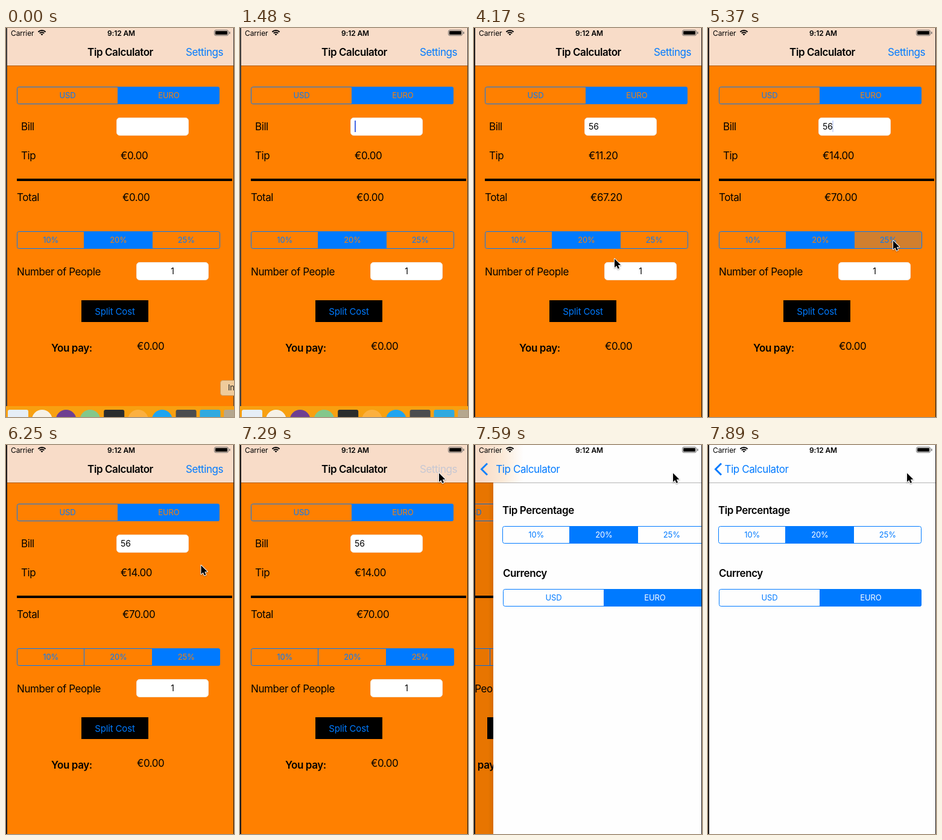
An HTML page with a canvas for the animation above (8000 ms loop, 378 by 643 pixels).

```html
<!DOCTYPE html>
<html lang="en">
<head>
<meta charset="utf-8">
<title>Tip Calculator</title>
<style>
html, body { margin: 0; width: 100%; height: 100%; overflow: hidden; background: #ff8000; }
canvas { display: block; width: 378px; height: 643px; }
</style>
</head>
<body>
<canvas id="stage"></canvas>
<script>
const W = 378, H = 643, LOOP = 8000, STEP = 149;
const BLUE = '#007aff', ORANGE = '#ff8000', PEACH = '#f8dcc8', PAGE = '#fefefe';
const PRESS_RATE = 5300, PICK_RATE = 5450, PRESS_SETTINGS = 7200, PUSH = 7370;

const canvas = document.getElementById('stage');
const dpr = window.devicePixelRatio || 1;
canvas.width = W * dpr;
canvas.height = H * dpr;
const ctx = canvas.getContext('2d');

const clamp = v => Math.min(1, Math.max(0, v));
const smooth = v => v * v * (3 - 2 * v);
const lerp = (a, b, k) => a + (b - a) * k;

const sampled = t => Math.floor((t + 19) / STEP) * STEP;

// Blinks with a short fade; focus and key presses restart the cycle.
function caretAlpha(t) {
  const half = 492, fade = 150;
  const start = [261, 2466, 3100, 3360].filter(s => s <= t).pop();
  if (start === undefined || t > PRESS_SETTINGS) return 0;
  const age = t - start, phase = age % (2 * half);
  if (phase >= half) return clamp(1 - (phase - half) / fade);
  return age < half ? 1 : clamp(phase / fade);
}

function typed(t) {
  return '56'.slice(0, Math.max(0, Math.floor((t - 2970) / STEP)));
}

// Stops of the mouse: time, x, y.
const STOPS = [[1900, 380, 650], [2370, 365, 389.5], [3750, 365, 389.5], [4170, 233, 381.5],
  [4350, 233, 381.5], [5070, 307, 351.5], [5850, 307, 351.5], [6700, 342, 27], [7000, 330, 46.5]];

function pointerAt(t) {
  const i = STOPS.findIndex(stop => stop[0] > t);
  if (i < 1) return STOPS[i === 0 ? 0 : STOPS.length - 1].slice(1);
  const [t0, x0, y0] = STOPS[i - 1], [t1, x1, y1] = STOPS[i];
  const k = smooth((t - t0) / (t1 - t0));
  return [lerp(x0, x1, k), lerp(y0, y1, k)];
}

// Critically damped spring.
function pushAt(t) {
  const w = Math.max(0, t - PUSH) * .0182;
  const p = 1 - (1 + w) * Math.exp(-w);
  return p > .995 ? 1 : p;
}

function text(str, x, y, { size = 17, weight = 400, color = '#000', align = 'left', alpha = 1 } = {}) {
  ctx.save();
  ctx.globalAlpha *= alpha;
  ctx.font = `${weight} ${size}px Inter, Roboto, sans-serif`;
  ctx.letterSpacing = (size > 15 ? -.025 : -.01) * size + 'px';
  ctx.textAlign = align;
  ctx.fillStyle = color;
  ctx.fillText(str, x, y);
  ctx.restore();
}

function rect(x, y, w, h, color) {
  ctx.fillStyle = color;
  ctx.fillRect(x, y, w, h);
}

function roundRect(x, y, w, h, r, fill, stroke) {
  ctx.beginPath();
  ctx.roundRect(x, y, w, h, r);
  if (fill) { ctx.fillStyle = fill; ctx.fill(); }
  if (stroke) { ctx.strokeStyle = stroke; ctx.lineWidth = 1; ctx.stroke(); }
}

function segments(x, y, w, labels, selected, back, pressed = -1) {
  const cell = w / labels.length, h = 29;
  ctx.save();
  ctx.beginPath();
  ctx.roundRect(x, y, w, h, 3.5);
  ctx.clip();
  labels.forEach((label, i) => {
    const left = Math.round(x + i * cell), right = Math.round(x + (i + 1) * cell);
    if (i === selected) rect(left, y, right - left, h, BLUE);
    if (i === pressed) rect(left, y, right - left, h, 'rgba(0,122,255,.18)');
    if (i) rect(left - 1, y, 1, h, BLUE);
    text(label, x + (i + .5) * cell, y + 19,
      { size: 13, align: 'center', color: i === selected ? back : BLUE });
  });
  ctx.restore();
  roundRect(x + .5, y + .5, w - 1, h - 1, 3, null, BLUE);
}

function field(x, y) {
  roundRect(x + .5, y + .5, 119, 29, 5, '#fff', '#f0e6dc');
}

const money = value => '€' + value.toFixed(2);

function calculator(t) {
  const bill = typed(t);
  const tip = bill * (t > PRESS_RATE ? .25 : .2);
  const picked = t > PICK_RATE;
  rect(0, 0, W + 120, H, ORANGE);
  segments(18, 97, 336, ['USD', 'EURO'], 1, ORANGE);

  text('Bill', 25, 169);
  field(183, 148);
  text(bill, 190, 168, { size: 14 });
  ctx.globalAlpha = caretAlpha(t);
  rect(190 + bill.length * 8, 153, 2, 19, '#4468e4');
  ctx.globalAlpha = 1;

  text('Tip', 25, 217);
  text(money(tip), 190, 217);
  rect(18, 249, 357, 4, '#000');
  text('Total', 18, 286);
  text(money(tip + +bill), 193, 286);

  segments(18, 336, 337, ['10%', '20%', '25%'], picked ? 2 : 1, ORANGE,
    t > PRESS_RATE && !picked ? 2 : -1);
  text('Number of People', 18, 408.5);
  field(216, 387);
  text('1', 276, 407, { size: 14, align: 'center' });

  rect(125, 450, 111, 36, '#000');
  text('Split Cost', 180.5, 473.5, { size: 15, color: BLUE, align: 'center' });
  text('You pay:', 75, 535, { weight: 600 });
  text('€0.00', 217, 532);
}

function settings() {
  rect(2, 0, W, H, PAGE);
  text('Tip Percentage', 17, 114, { weight: 600 });
  segments(17, 134, 337, ['10%', '20%', '25%'], 1, '#fff');
  text('Currency', 18, 218, { weight: 600 });
  segments(18, 238, 336, ['USD', 'EURO'], 1, '#fff');
}

function statusBar() {
  text('Carrier', 8, 12.5, { size: 12 });
  text('9:12 AM', 191, 12.5, { size: 12, weight: 600, align: 'center' });
  ctx.strokeStyle = '#000';
  ctx.lineWidth = 2;
  for (const r of [1.8, 5.2, 8.6]) {
    ctx.beginPath();
    ctx.arc(59.5, 12.5, r, -Math.PI * .75, -Math.PI * .25);
    ctx.stroke();
  }
  roundRect(345.5, 3.5, 23, 9, 2.5, null, '#666');
  roundRect(347, 5, 20, 6, 1, '#000');
  roundRect(370, 6, 1.5, 4, 1, '#666');
}

function navBar(t, p, edge) {
  const blur = ctx.createLinearGradient(edge - 20, 0, edge + 50, 0);
  blur.addColorStop(0, PEACH);
  blur.addColorStop(.5, '#fbead8');
  blur.addColorStop(1, PAGE);
  rect(0, 0, W, 62, p === 0 ? PEACH : p === 1 ? PAGE : blur);
  rect(0, 62, W, 1, 'rgba(0,0,0,.3)');
  statusBar();

  // The title turns into the back button.
  const x = lerp(189.5, 80.5, p < .8 ? p * .85 : p);
  const swap = clamp((p - .35) / .5);
  text('Tip Calculator', x, 46, { weight: 600, align: 'center', alpha: clamp(1 - p * .75) * (1 - swap) });
  text('Tip Calculator', x, 46, { color: BLUE, align: 'center', alpha: swap });
  ctx.globalAlpha = p;
  ctx.strokeStyle = BLUE;
  ctx.lineWidth = 3;
  ctx.beginPath();
  ctx.moveTo(22, 30.5);
  ctx.lineTo(12.5, 40);
  ctx.lineTo(22, 49.5);
  ctx.stroke();
  ctx.globalAlpha = 1;

  const fade = t < PRESS_SETTINGS ? 1 : p === 0 ? .2 : clamp(.5 - p * .55);
  text('Settings', 298, 46, { color: BLUE, alpha: fade });
}

// Icons alternate between tiles (t) and discs (d).
const ICONS = ['t#e6eef6', 'd#f6f1e6', 'd#6e3f91', 'd#84c78b', 't#2a2d2d',
  'd#fbb040', 'd#1ea4f0', 't#4a4c4e', 't#2fa9e0', 't#b5a78e'];

function dock(offset) {
  ctx.save();
  ctx.translate(0, offset);
  rect(0, 625, W, 60, '#f8a010');
  ICONS.forEach((icon, i) => {
    const round = icon[0] === 'd';
    roundRect(3 + i * 39.8, 631, 34, 34, round ? 17 : 3, icon.slice(1));
  });
  ctx.restore();
}

function tooltip(alpha) {
  ctx.globalAlpha = alpha;
  roundRect(355.5, 582.5, 40, 25, 4, '#efcb9b', '#c79a60');
  text('In', 368, 599, { size: 13, color: '#222' });
  ctx.globalAlpha = 1;
}

function pointer(x, y) {
  const shape = [[0, 0], [0, 14.5], [3.3, 11.5], [5.6, 16.6], [8, 15.6], [5.8, 10.6], [10.3, 10.3]];
  ctx.save();
  ctx.translate(x, y);
  ctx.beginPath();
  shape.forEach(([a, b]) => ctx.lineTo(a, b));
  ctx.closePath();
  ctx.lineJoin = 'round';
  ctx.lineWidth = 2;
  ctx.strokeStyle = '#fff';
  ctx.shadowColor = 'rgba(0,0,0,.35)';
  ctx.shadowBlur = 2;
  ctx.shadowOffsetY = 1;
  ctx.stroke();
  ctx.shadowColor = 'transparent';
  ctx.fillStyle = '#000';
  ctx.fill();
  ctx.restore();
}

function draw(t) {
  const p = pushAt(t);
  const slide = Math.round(376 * (1 - p));
  const edge = slide + 2;
  ctx.setTransform(dpr, 0, 0, dpr, 0, 0);

  ctx.save();
  ctx.translate(-Math.round(112 * p), 0);
  calculator(t);
  ctx.restore();
  if (p) {
    rect(0, 0, W, H, `rgba(0,0,0,${.1 * p})`);
    const shade = ctx.createLinearGradient(edge - 9, 0, edge, 0);
    shade.addColorStop(0, 'rgba(0,0,0,0)');
    shade.addColorStop(1, 'rgba(0,0,0,.07)');
    rect(edge - 9, 63, 9, H, shade);
    ctx.save();
    ctx.translate(slide, 0);
    settings();
    ctx.restore();
  }
  navBar(t, p, edge);

  const frame = t < 1780 ? '#3c3a3a' : '#1c1818';
  rect(0, 0, 2, H, frame);
  rect(377, 0, 1, H, frame);
  dock(30 * smooth(clamp((t - 1680) / 400)));
  tooltip(clamp(1 - t / 298));
  pointer(...pointerAt(t));
}

function tick() {
  draw(sampled(performance.now() % LOOP));
  requestAnimationFrame(tick);
}
tick();
</script>
</body>
</html>
```
